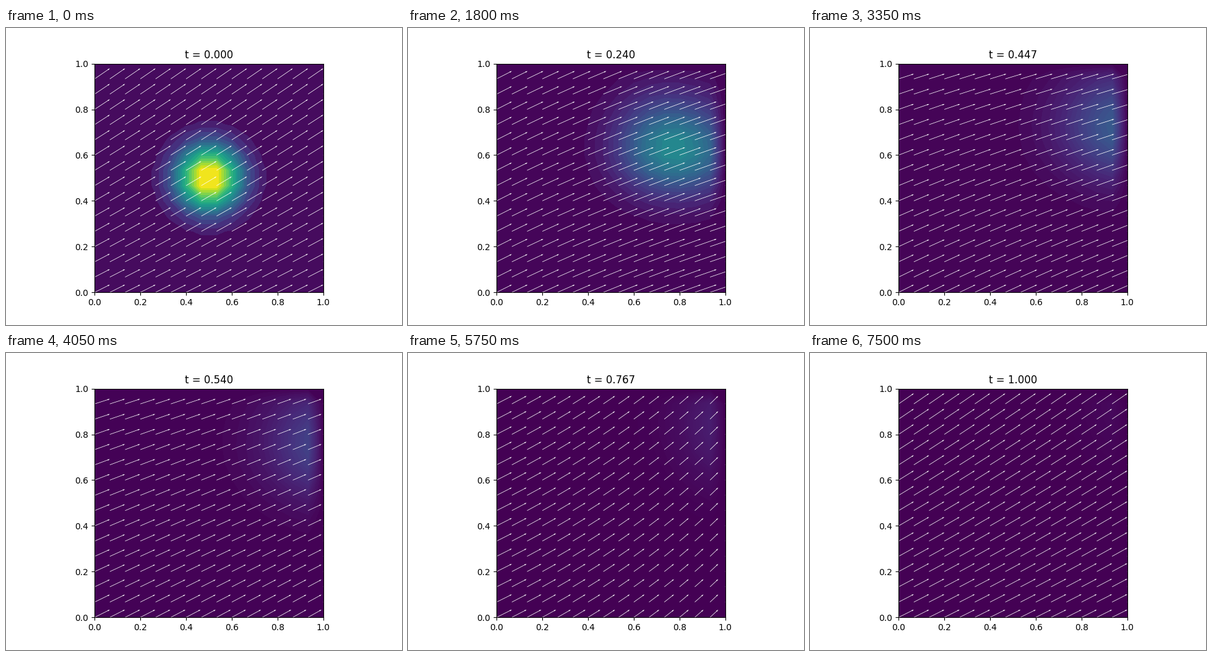
Recreate the animation shown at these times as a matplotlib script. Size 640 by 480 pixels, loop 7.55 s.

```python
import numpy as np
import matplotlib.pyplot as plt
from matplotlib.animation import FuncAnimation

N = 15            # cells per side
STEPS = 150
H, DT = 1 / N, 1 / STEPS
DIFF = 0.003

axis = np.linspace(0, 1, N + 1)
X, Y = np.meshgrid(axis, axis)


def velocity(t):
    vx = 1 + 0.5 * X * np.sin(2 * np.pi * t)
    vy = 0.5 + 0.2 * Y * np.cos(2 * np.pi * t)
    return vx, vy


def advance(u, t):
    """One explicit upwind step with the edges held at zero."""
    vx, vy = (v[1:-1, 1:-1] for v in velocity(t))
    mid = u[1:-1, 1:-1]
    left, right = u[1:-1, :-2], u[1:-1, 2:]
    below, above = u[:-2, 1:-1], u[2:, 1:-1]
    flow = (vx * (mid - left) + vy * (mid - below)) / H
    spread = DIFF * (left + right + below + above - 4 * mid) / H**2
    new = np.zeros_like(u)
    new[1:-1, 1:-1] = mid + DT * (spread - flow)
    return new


fields = [np.exp(-50 * ((X - 0.5) ** 2 + (Y - 0.5) ** 2))]
for k in range(STEPS):
    fields.append(advance(fields[-1], k * DT))
top = fields[0].max()

fig, ax = plt.subplots(figsize=(6.4, 4.8), dpi=100)
ax.set_aspect("equal")
arrows = ax.quiver(X, Y, *velocity(0), color="white", scale=15,
                   width=0.002, zorder=2)
title = ax.set_title("t = 0.000")
shown = []


def draw(i):
    while shown:
        shown.pop().remove()
    t = i * DT
    shown.append(ax.contourf(X, Y, fields[i], 20, cmap="viridis",
                             vmin=0, vmax=top, zorder=1))
    arrows.set_UVC(*velocity(t))
    ax.set_xlim(0, 1)
    ax.set_ylim(0, 1)
    title.set_text(f"t = {t:.3f}")
    return []


anim = FuncAnimation(fig, draw, frames=STEPS + 1, init_func=lambda: draw(0),
                     interval=50, repeat=True, repeat_delay=0, blit=False)
plt.show()
```
